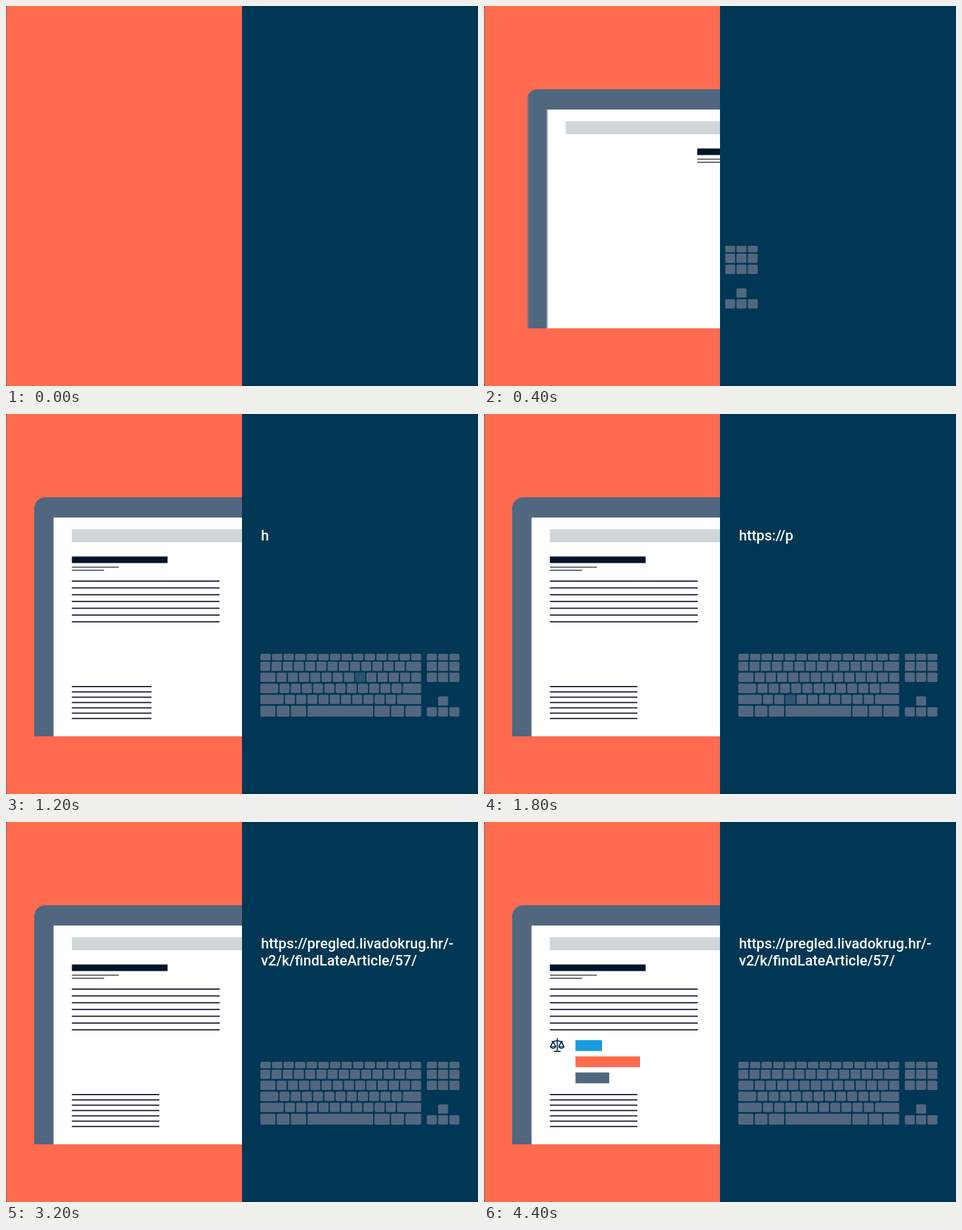
Write an HTML page with a canvas that moves like this. It is 720 by 580 pixels and loops after 4.6 s.

```html
<!DOCTYPE html>
<html lang="hr">
<head>
<meta charset="utf-8">
<title>Keyboard and screen</title>
<style>
  html, body { margin: 0; width: 100%; height: 100%; overflow: hidden; background: #003754; }
  canvas { display: block; }
</style>
</head>
<body>
<canvas id="stage" width="720" height="580"></canvas>
<script>
const ctx = document.getElementById('stage').getContext('2d');
const LOOP = 4600, STEP = 200, MID = 360;
const CORAL = '#ff6b4f', NAVY = '#003754', SLATE = '#50677f', INK = '#03132a';
const URL_LINES = ['https://pregled.livadokrug.hr/-', 'v2/k/findLateArticle/57/'];

const clamp = v => Math.max(0, Math.min(1, v));
const outCubic = p => 1 - (1 - p) ** 3;
const inOutQuad = p => p < 0.5 ? 2 * p * p : 1 - 2 * (1 - p) ** 2;

// Linear interpolation through [time, value] points.
function track(points, t) {
  if (t <= points[0][0]) return points[0][1];
  for (let i = 1; i < points.length; i++) {
    const [t0, a] = points[i - 1], [t1, b] = points[i];
    if (t <= t1) return a + (b - a) * (t - t0) / (t1 - t0);
  }
  return points[points.length - 1][1];
}

function rect(x, y, w, h, color) {
  ctx.fillStyle = color;
  ctx.fillRect(x, y, w, h);
}

function rounded(x, y, w, h, r, color) {
  ctx.fillStyle = color;
  ctx.beginPath();
  ctx.roundRect(x, y, w, h, r);
  ctx.fill();
}

// Left edge fades over the given width, as moving shapes do.
function softFill(x, color, fade) {
  if (!fade) return color;
  const g = ctx.createLinearGradient(x, 0, x + fade, 0);
  g.addColorStop(0, color + '00');
  g.addColorStop(1, color);
  return g;
}

// Monitor
const MONITOR_X = [[0, 360], [200, 232], [400, 22], [600, -1.5], [800, 0]];
const MONITOR_FADE = [[200, 12], [400, 4], [600, 0]];

function drawMonitor(t) {
  const dx = track(MONITOR_X, t), fade = track(MONITOR_FADE, t);
  const panel = (x, y, h, r, color) => {
    const left = x + dx;
    rounded(left, y, 420, h, [r, 0, 0, 0], softFill(left, color, fade));
  };
  panel(43, 127, 365, 17, SLATE);
  panel(72.5, 158, 334, 0, '#ffffff');
  panel(100.5, 176, 19.7, 0, '#cfd6d9');
}

// Text block that slides in from the right while it widens.
function slideIn(t, start, scale, origin, draw) {
  if (t < start) return;
  const p = clamp((t - start) / 400);
  const s = scale + (1 - scale) * clamp((t - start) / 800);
  const x = origin + (100.5 - origin) * s + 227 * (1 - outCubic(p));
  draw(x, s);
}

function lines(x, y, w, pitch) {
  for (let i = 0; i < 7; i++) rect(x, y + i * pitch, w, 1.8, '#111a27');
}

function drawPage(t) {
  slideIn(t, 400, 0.74, 92, (x, s) => {
    rect(x, 217.5, 146 * s, 10, INK);
    rect(x, 233, 71.5 * s, 1.4, '#33334a');
    rect(x, 237.8, 49 * s, 1.4, '#1f2c40');
  });
  slideIn(t, 570, 0.995, 100.5, (x, s) => lines(x, 254.2, 225.5 * s, 10.35));
  slideIn(t, 800, 0.82, 100.5, (x, s) => lines(x, 415.2, 133.5 * s, 8.1));
}

function drawScales(t) {
  const p = outCubic(clamp((t - 3300) / 500));
  if (!p) return;
  ctx.save();
  ctx.translate(111.7, 341);
  ctx.scale(p, p);
  ctx.strokeStyle = '#06304d';
  ctx.lineWidth = 1.7;
  ctx.lineCap = ctx.lineJoin = 'round';
  ctx.beginPath();
  ctx.moveTo(0, -10.5); ctx.lineTo(0, 9.2);
  ctx.moveTo(-4.5, 9.2); ctx.lineTo(4.5, 9.2);
  ctx.moveTo(-8, -6); ctx.quadraticCurveTo(-3, -6, 0, -7.5);
  ctx.quadraticCurveTo(3, -6, 8, -6);
  for (const x of [-6.3, 6.3]) {
    ctx.moveTo(x, -6); ctx.lineTo(x - 4, 2);
    ctx.quadraticCurveTo(x, 7, x + 4, 2);
    ctx.lineTo(x, -6);
    ctx.moveTo(x - 4, 2); ctx.lineTo(x + 4, 2);
  }
  ctx.stroke();
  ctx.restore();
}

function drawBars(t) {
  const p = inOutQuad(clamp((t - 3600) / 800));
  rect(139.5, 333, 40.5 * p, 16.5, '#189cdd');
  rect(139.5, 357.7, 98.5 * p, 16.5, CORAL);
  rect(139.5, 382.3, 51.5 * p, 16.5, SLATE);
}

// Keyboard: each row lists the left edges of its keys and its right end.
const steps = (x, n, pitch = 17.1) => Array.from({ length: n }, (_, i) => x + i * pitch);
const ROWS = [
  { y: 366, h: 10, edges: [...steps(388, 14, 17.7), 635.3] },
  { y: 378, h: 14.3, edges: [...steps(388, 14), 635.3] },
  { y: 394.8, h: 14.3, edges: [388, ...steps(413, 13), 635.3] },
  { y: 411.6, h: 14.3, edges: [388, ...steps(417.3, 12), 635.3] },
  { y: 428.4, h: 14.3, edges: [388, ...steps(425.6, 11), 635.3] },
  { y: 445.2, h: 16.7, edges: [388, 413, 434.5, 460, 562, 587.3, 609.3, 635.3] }
];
const KEYBOARD_X = [[200, -420], [400, -274], [600, -51], [800, 5.5], [1000, 0]];
// time: [row, key, strength]
const PRESSES = {
  1200: [2, 8, 0.6], 1400: [4, 10, 0.5], 1600: [3, 2, 0.5], 1800: [4, 3, 0.5],
  2000: [1, 10, 0.5], 2200: [2, 6, 0.5], 2400: [2, 2, 0.35], 2600: [3, 8, 0.5],
  2800: [4, 7, 0.5], 3000: [2, 5, 0.5]
};

function drawKeyboard(t) {
  const dx = track(KEYBOARD_X, t);
  const press = PRESSES[t];
  const key = (x, y, w, h, color = '#52677f') => rounded(x + dx, y, w, h, 1.8, color);
  ROWS.forEach(({ y, h, edges }, r) => {
    for (let i = 0; i < edges.length - 1; i++) {
      const x = edges[i], w = edges[i + 1] - x - 2;
      key(x, y, w, h);
      if (press && press[0] === r && press[1] === i) key(x, y, w, h, `rgba(14,70,104,${press[2]})`);
    }
  });
  for (const x of steps(642, 3, 17.2)) {
    for (const { y, h } of ROWS.slice(0, 3)) key(x, y, 15.2, h);
    key(x, 447.5, 15.2, 14.3);
  }
  key(659.2, 431, 15.2, 14);
}

// Typed address
const TYPED = [[1000, 0], [1200, 1], [2000, 12], [2400, 22], [2600, 31], [3200, 55]];

function drawAddress(t) {
  let left = Math.round(track(TYPED, t));
  ctx.fillStyle = '#ffffff';
  ctx.font = '500 21.8px Roboto, sans-serif';
  URL_LINES.forEach((line, i) => {
    ctx.fillText(line.slice(0, Math.max(0, left)), 389, 192.7 + i * 26.3);
    left -= line.length;
  });
}

function half(x, color, draw) {
  ctx.save();
  ctx.beginPath();
  ctx.rect(x, 0, MID, 580);
  ctx.clip();
  rect(x, 0, MID, 580, color);
  draw();
  ctx.restore();
}

function render(now) {
  const t = Math.floor((now % LOOP) / STEP) * STEP;
  half(0, CORAL, () => {
    rect(0, 0, 1, 580, '#7d6a78');
    drawMonitor(t);
    drawPage(t);
    drawScales(t);
    drawBars(t);
  });
  half(MID, NAVY, () => {
    drawKeyboard(t);
    drawAddress(t);
  });
}

const begin = performance.now();
function tick() {
  render(performance.now() - begin);
  requestAnimationFrame(tick);
}
tick();
</script>
</body>
</html>
```
